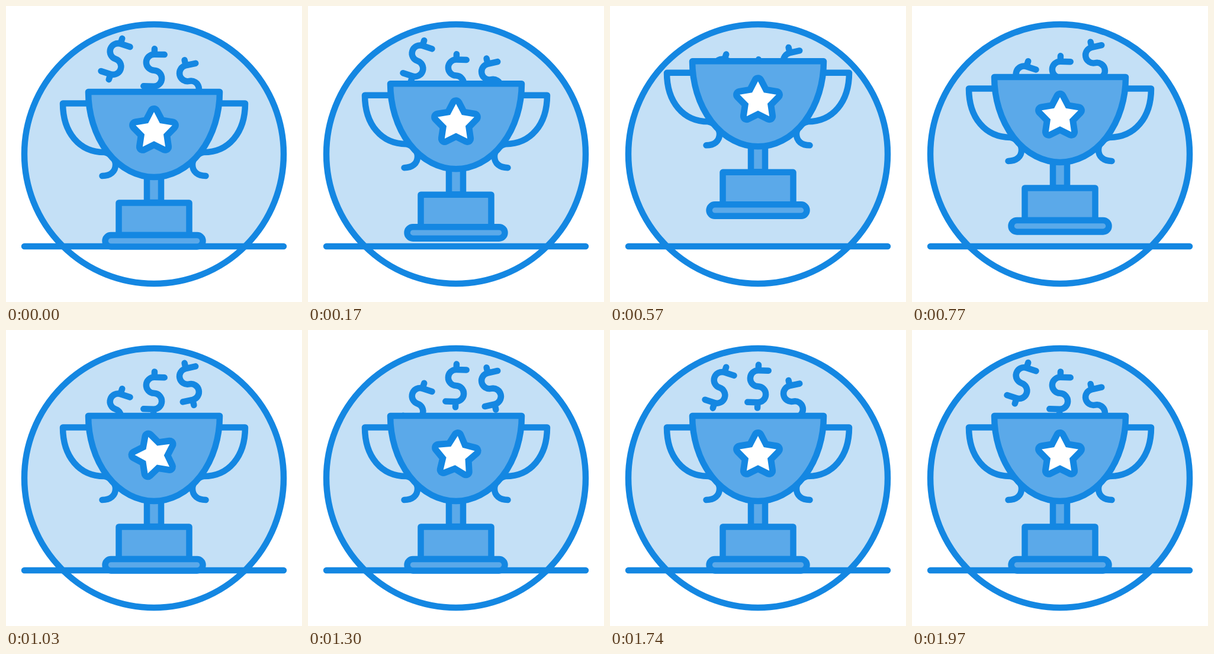
Recreate the animation shown at these times as an HTML page. Size 500 px wide and 500 px high, loop 2000 ms.

```html
<!DOCTYPE html>
<html lang="en">
<head>
<meta charset="utf-8">
<title>Trophy</title>
<style>
  html, body { margin: 0; width: 100%; height: 100%; overflow: hidden; background: #fff; }
  svg { display: block; width: 100vw; height: 100vh; }
  .line { fill: none; stroke: #1487e2; stroke-width: 10.5; stroke-linecap: round; stroke-linejoin: round; }
  .solid { fill: #5ba9e9; }
</style>
</head>
<body>
<svg viewBox="0 0 500 500">
  <defs>
    <clipPath id="sky"><rect width="500" height="406"/></clipPath>
    <path id="dollar" d="M17-27H0a13.5 13.5 0 0 0 0 27a13.5 13.5 0 0 1 0 27H-17M0-36.4V-27M0 27V36.4"/>
    <path id="handle" d="M139 164.5H96C96 214 124 247 166 247C178 250 185 259 185 268C185 280 176 287 162.500 287"/>
  </defs>
  <circle cx="250" cy="250" r="219" fill="#c4e0f6" clip-path="url(#sky)"/>
  <g class="line">
    <circle cx="250" cy="250" r="219"/>
    <path d="M31 406H469"/>
    <use id="left" href="#dollar"/>
    <use id="middle" href="#dollar"/>
    <use id="right" href="#dollar"/>
    <g id="trophy">
      <use href="#handle"/>
      <use href="#handle" transform="matrix(-1 0 0 1 500 0)"/>
      <path class="solid" d="M238 285H262V332H238Z"/>
      <path class="solid" d="M190.500 332.500H309.500V387H190.500Z"/>
      <rect class="solid" x="167.500" y="387" width="165" height="19.500" rx="9.750"/>
      <path class="solid" d="M139 145H361A111 144 0 0 1 139 145Z"/>
      <g id="star">
        <path class="tip" stroke-width="22" style="stroke-width:22"/>
        <path class="tip" fill="#fff" stroke="none"/>
      </g>
    </g>
  </g>
</svg>
<script>
  const $ = id => document.getElementById(id);
  const ease = u => (u = Math.min(1, Math.max(0, u)), u * u * (3 - 2 * u));
  // Eased rise and fall: 0 to 1 to 0 over twice the half length
  const pulse = (f, half) => ease(1 - Math.abs(f / half - 1));
  const bob = f => pulse(f % 60, 30);

  const corners = Array.from({ length: 10 }, (_, i) => {
    const r = i % 2 ? 16.8 : 32.5, a = i * Math.PI / 5;
    return [250 + r * Math.sin(a), 211.5 - r * Math.cos(a)].map(v => v.toFixed(2)).join(" ");
  });
  for (const el of document.querySelectorAll(".tip")) el.setAttribute("d", `M${corners.join("L")}Z`);

  const set = (id, value) => $(id).setAttribute("transform", value);
  const place = (id, x, y, angle) => set(id, `translate(${x} ${y}) rotate(${angle})`);

  function draw(f) {
    place("left", 185, 89.5 + 44.5 * bob(f), 18);
    place("middle", 250, 90.1 + 37.1 * bob(f + 15), 1.5);
    place("right", 309.5, 126.8 - 35.5 * bob(f), -12.5);
    set("trophy", `translate(0 ${-54 * pulse(f, 15.1)})`);
    set("star", `rotate(${-360 * ease((f - 23) / 17.2)} 250 211.5)`);
  }

  const start = performance.now();
  function tick() {
    const t = (performance.now() - start) % 2000;
    draw(Math.floor(t * 0.03 + 0.15) % 60); // 30 steps per second
    requestAnimationFrame(tick);
  }
  tick();
</script>
</body>
</html>
```
